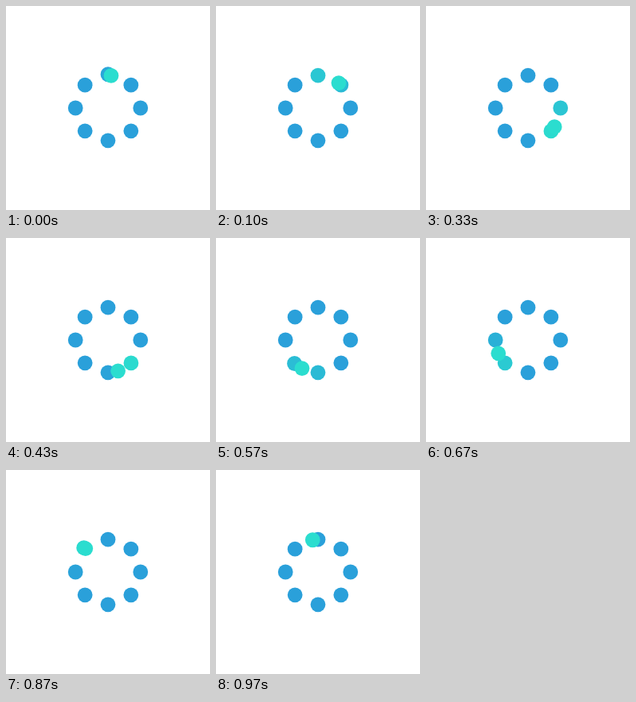
Animation, 256 px wide and 256 px high, one loop 1.01 s. Source, as an HTML page:

```html
<!DOCTYPE html>
<html lang="en">
<head>
<meta charset="utf-8">
<title>Loader</title>
<style>
  html, body { margin: 0; width: 100%; height: 100%; overflow: hidden; background: #fff; }
  svg { display: block; width: 100vw; height: 100vh; }
</style>
</head>
<body>
<svg id="stage" viewBox="0 0 256 256"></svg>
<script>
const LOOP = 1010, STEPS = 30;
const CENTER = 128, RING = 40.8, RADIUS = 9.4;
const PUSH = 4.7, PUSH_SPAN = 56;
const BLUE = [42, 160, 218], CYAN = [43, 218, 207];

// Midpoints of each dot's fade in and fade out, in ms
const GLOW = [[35, 115], [105, 260], [200, 342], [200, 490],
              [470, 565], [570, 690], [690, 830], [820, 920]];
const FADE = 90;

// Time in ms and angle of the orbiting dot, clockwise from the top
const ORBIT = [[0, 5.6], [200, 73.5], [330, 125.5], [430, 162],
               [570, 209.4], [770, 282], [970, 350.5], [1010, 365.6]];

const stage = document.getElementById('stage');
const clamp = v => Math.min(1, Math.max(0, v));
const mix = (a, b, k) => a + (b - a) * k;

function makeDot() {
  const dot = document.createElementNS('http://www.w3.org/2000/svg', 'circle');
  dot.setAttribute('r', RADIUS);
  return stage.appendChild(dot);
}

function place(dot, angle, dist) {
  const a = angle * Math.PI / 180;
  dot.setAttribute('cx', (CENTER + dist * Math.sin(a)).toFixed(2));
  dot.setAttribute('cy', (CENTER - dist * Math.cos(a)).toFixed(2));
}

function orbitAngle(t) {
  const i = ORBIT.findIndex(p => p[0] > t);
  const [t0, a0] = ORBIT[i - 1], [t1, a1] = ORBIT[i];
  return mix(a0, a1, (t - t0) / (t1 - t0));
}

function pushAt(i, t) {
  const d = Math.abs(t - (35 + 115 * i));
  return d < PUSH_SPAN ? PUSH * (1 + Math.cos(Math.PI * d / PUSH_SPAN)) / 2 : 0;
}

function glowAt(i, t) {
  const [rise, fall] = GLOW[i];
  return Math.min(clamp(0.5 + (t - rise) / FADE), clamp(0.5 + (fall - t) / FADE));
}

const stepStart = n => Math.round(n * 10 / 3) * 10;

function stepTime(t) {
  let n = STEPS - 1;
  while (n > 0 && stepStart(n) > t) n--;
  return stepStart(n);
}

const dots = GLOW.map(makeDot);
const runner = makeDot();
runner.setAttribute('fill', 'rgb(43,221,207)');

function draw(t) {
  dots.forEach((dot, i) => {
    place(dot, i * 45, RING + pushAt(i, t));
    const k = glowAt(i, t);
    dot.setAttribute('fill', `rgb(${BLUE.map((c, j) => Math.round(mix(c, CYAN[j], k)))})`);
  });
  place(runner, orbitAngle(t), RING);
}

const began = performance.now();
function tick() {
  draw(stepTime((performance.now() - began) % LOOP));
  requestAnimationFrame(tick);
}
tick();
</script>
</body>
</html>
```
